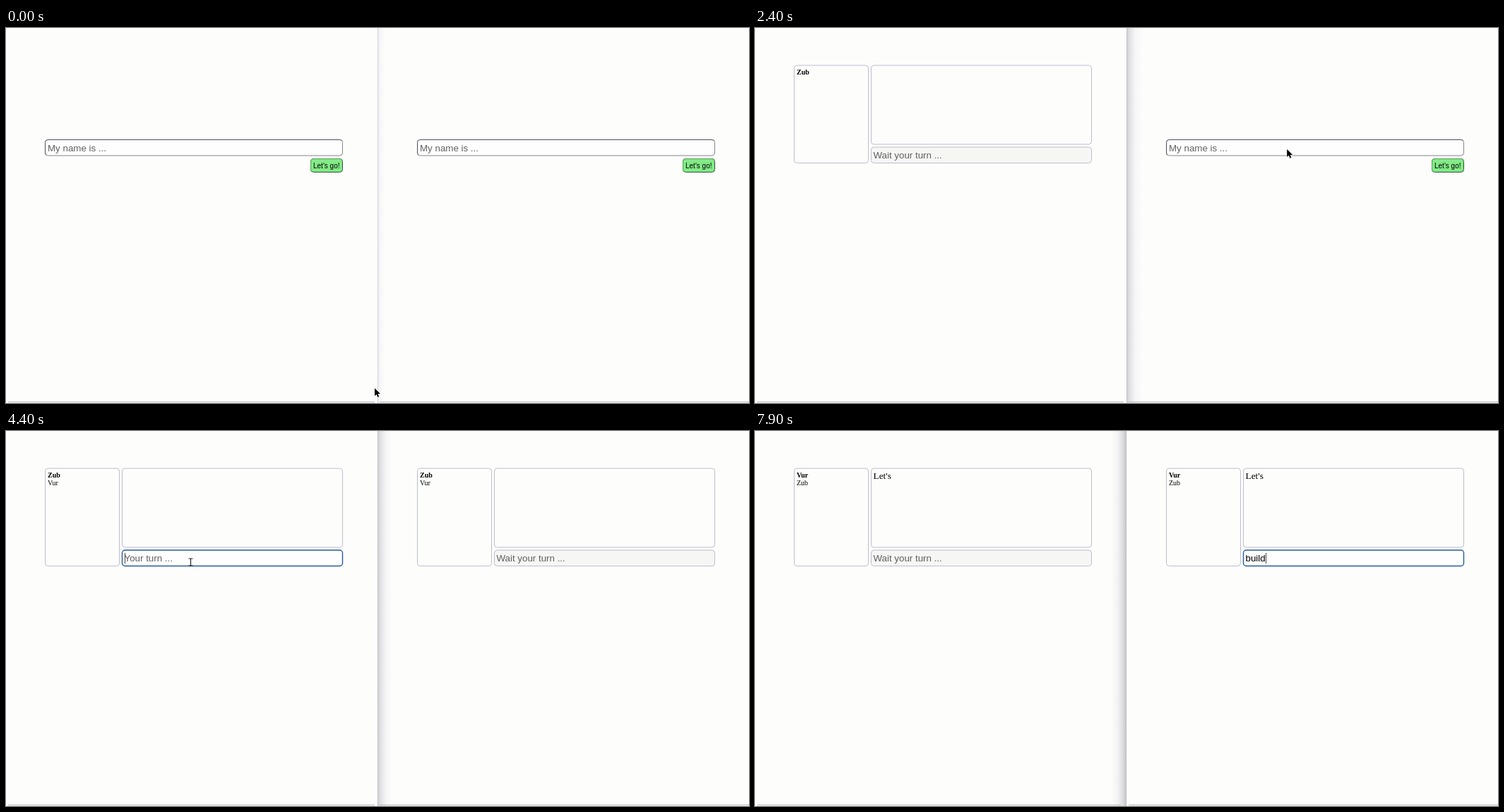
Write an HTML page with a canvas that moves like this. It is 1052x532 px and loops after 8 s.

```html
<!DOCTYPE html>
<html lang="en">
<head>
<meta charset="utf-8">
<title>Two player word game</title>
<style>
  html, body { margin: 0; width: 100%; height: 100%; overflow: hidden; background: #fdfdfc; }
  canvas { display: block; }
</style>
</head>
<body>
<canvas id="stage" width="1052" height="532"></canvas>
<script>
const c = document.getElementById('stage').getContext('2d');
const LOOP = 8000, STEP = 100, SPLIT = 526, OFFSET = 527;
const SANS = '13.333px "Liberation Sans", Arial, sans-serif';
const SMALL = '10px "Liberation Sans", Arial, sans-serif';
const SERIF = '"Liberation Serif", "Times New Roman", serif';
const ONE = 'Zub', TWO = 'Vur', FIRST_WORD = "Let's", NEXT_WORD = 'build';
const SOFT = '#bdbdcc', FOCUS = '#285b9c', HINT = '#606060';

const JOIN_ONE = 1800, JOIN_TWO = 3600, SEND = 6100;
// Window clicks: [time, focused side]
const CLICKS = [[0, -1], [800, 0], [2500, 1], [4300, 0], [7100, 1]];
const KEYS = {
  one: [1300, 1400, 1500],
  two: [2900, 3000, 3200],
  first: [4700, 4900, 5000, 5200, 5400],
  next: [7400, 7500, 7600, 7800, 7900]
};
// Pointer trips: [start, end, hidden from, x0, y0, x1, y1]
const TRIPS = [
  [0, 800, 1300, 522, 511, 262, 172],
  [1800, 2500, 2900, 262, 172, 782, 172],
  [3700, 4300, 4700, 782, 172, 261, 186],
  [6200, 6800, 7400, 261, 186, 775, 178]
];

function text(s, x, y, font, color) {
  c.font = font;
  c.fillStyle = color;
  c.fillText(s, x, y);
}

function box(x, y, w, h, stroke, fill, line = 1) {
  c.beginPath();
  c.roundRect(x, y, w, h, 4);
  if (fill) { c.fillStyle = fill; c.fill(); }
  c.strokeStyle = stroke;
  c.lineWidth = line;
  c.stroke();
}

// Border lit from one corner, as on native form controls
function bevel(x, y, w, h, light, dark, fill) {
  const g = c.createLinearGradient(x + w - h, y + h, x + w, y + h + h);
  g.addColorStop(0, light);
  box(x, y, w, h, dark, fill);
  c.save();
  c.beginPath();
  c.moveTo(x - 1, y - 1);
  c.lineTo(x + w + 1, y - 1);
  c.lineTo(x + w - 3, y + 4);
  c.lineTo(x + 4, y + h - 3);
  c.lineTo(x - 1, y + h + 1);
  c.clip();
  box(x, y, w, h, light, fill);
  c.restore();
}

function field(x, y, t, hint, word, keys, focusedAt) {
  const count = keys.filter(k => k <= t).length;
  const typed = word.slice(0, count);
  text(typed || hint, x, y, SANS, typed ? '#000' : HINT);
  const last = count ? keys[count - 1] : focusedAt;
  if (focusedAt <= t && (t - last) % 1000 < 500) {
    c.fillStyle = '#444';
    c.fillRect(Math.round(x + c.measureText(typed).width), y - 12, 1, 15);
  }
}

function login(t, word, keys, focusedAt) {
  if (t >= focusedAt) box(55.5, 158.5, 421, 22.5, FOCUS, '#fefefe', 1.3);
  else bevel(55.5, 158.5, 421, 22.5, '#4b4b5e', '#85858c', '#fefefe');
  field(59, 174.5, t, 'My name is ...', word, keys, focusedAt);
  bevel(431.5, 185.5, 45, 19, '#5c9c62', '#33503a', '#82ea86');
  text("Let's go!", 435, 198.5, SMALL, '#000');
}

function game(t, side, focusedAt) {
  const sent = t >= SEND;
  const names = t < JOIN_TWO ? [ONE] : sent ? [TWO, ONE] : [ONE, TWO];
  const myTurn = names.length > 1 && sent === (side === 1);
  box(55.5, 53, 105, 138.5, SOFT);
  box(164.5, 53, 312, 112, SOFT);
  names.forEach((n, i) =>
    text(n, 59, 65.5 + i * 11.5, (i ? '' : 'bold ') + '10px ' + SERIF, '#000'));
  if (sent) text(FIRST_WORD, 167.5, 68, '13.333px ' + SERIF, '#000');

  const focused = myTurn && t >= focusedAt;
  box(164.5, 169, 312, 22.5, focused ? FOCUS : SOFT, myTurn ? '#fefefe' : '#f6f6f5', focused ? 1.4 : 1);
  if (myTurn) {
    field(167.5, 185, t, 'Your turn ...', side ? NEXT_WORD : FIRST_WORD,
      side ? KEYS.next : KEYS.first, focusedAt);
  } else text('Wait your turn ...', 167.5, 185, SANS, HINT);
}

function shadow(side) {
  const reach = side < 0 ? 11 : 22, dir = side === 1 ? -1 : 1;
  const g = c.createLinearGradient(SPLIT, 0, SPLIT + dir * reach, 0);
  const a = side < 0 ? 0.1 : side ? 0.32 : 0.25;
  [[0, 1], [0.25, 0.55], [0.55, 0.18], [1, 0]].forEach(([p, k]) =>
    g.addColorStop(p, `rgba(70,70,95,${a * k})`));
  c.fillStyle = g;
  c.fillRect(dir > 0 ? SPLIT : SPLIT - reach, 0, reach, 532);
  c.fillStyle = side < 0 ? '#d2d2e2' : '#bfbfc6';
  c.fillRect(side === 1 ? SPLIT - 1 : SPLIT, 0, 1, 532);
  c.fillStyle = '#b9b9c0';
  const end = side === 1 ? 518 : 522;
  c.fillRect(3, 530, end - 3, 1);
  c.fillRect(SPLIT + 3, 530, 1052 - SPLIT - 3, 1);
}

function arrow(x, y) {
  c.beginPath();
  [[0, 0], [0, 11], [2.5, 8.7], [4.3, 12.8], [6.2, 12], [4.5, 8], [8, 8]]
    .forEach(([dx, dy]) => c.lineTo(x + dx, y + dy));
  c.closePath();
  c.lineJoin = 'round';
  c.strokeStyle = '#fff';
  c.lineWidth = 1.6;
  c.stroke();
  c.fillStyle = '#000';
  c.fill();
}

function beam(x, y) {
  c.beginPath();
  c.moveTo(x - 2.5, y - 5);
  c.lineTo(x + 3.5, y - 5);
  c.moveTo(x + 0.5, y - 5);
  c.lineTo(x + 0.5, y + 5);
  c.moveTo(x - 2.5, y + 5);
  c.lineTo(x + 3.5, y + 5);
  c.strokeStyle = '#222';
  c.lineWidth = 1.2;
  c.stroke();
}

function pointer(t, focus) {
  const trip = TRIPS.find(([start, , hide]) => t >= start && t < hide);
  if (!trip) return;
  const [start, end, , x0, y0, x1, y1] = trip;
  const p = Math.min(1, (t - start) / (end - start));
  const e = p * p * (3 - 2 * p);
  const x = x0 + (x1 - x0) * e, y = y0 + (y1 - y0) * e;
  const side = x < SPLIT ? 0 : 1, local = x - side * OFFSET;
  const inGame = t >= (side ? JOIN_TWO : JOIN_ONE);
  const [left, top, bottom] = inGame ? [164, 169, 192] : [55, 158, 182];
  const over = local > left && local < 477 && y > top && y < bottom;
  (over && side === focus ? beam : arrow)(x, y);
}

function draw(now) {
  const t = Math.floor(now % LOOP / STEP) * STEP;
  const focus = CLICKS.filter(([at]) => at <= t).pop()[1];
  c.fillStyle = '#fdfdfc';
  c.fillRect(0, 0, 1052, 532);
  shadow(focus);
  if (t < JOIN_ONE) login(t, ONE, KEYS.one, CLICKS[1][0]);
  else game(t, 0, CLICKS[3][0]);
  c.save();
  c.translate(OFFSET, 0);
  if (t < JOIN_TWO) login(t, TWO, KEYS.two, CLICKS[2][0]);
  else game(t, 1, CLICKS[4][0]);
  c.restore();
  pointer(t, focus);
}

const begin = performance.now();
function tick() {
  draw(performance.now() - begin);
  requestAnimationFrame(tick);
}
tick();
</script>
</body>
</html>
```
